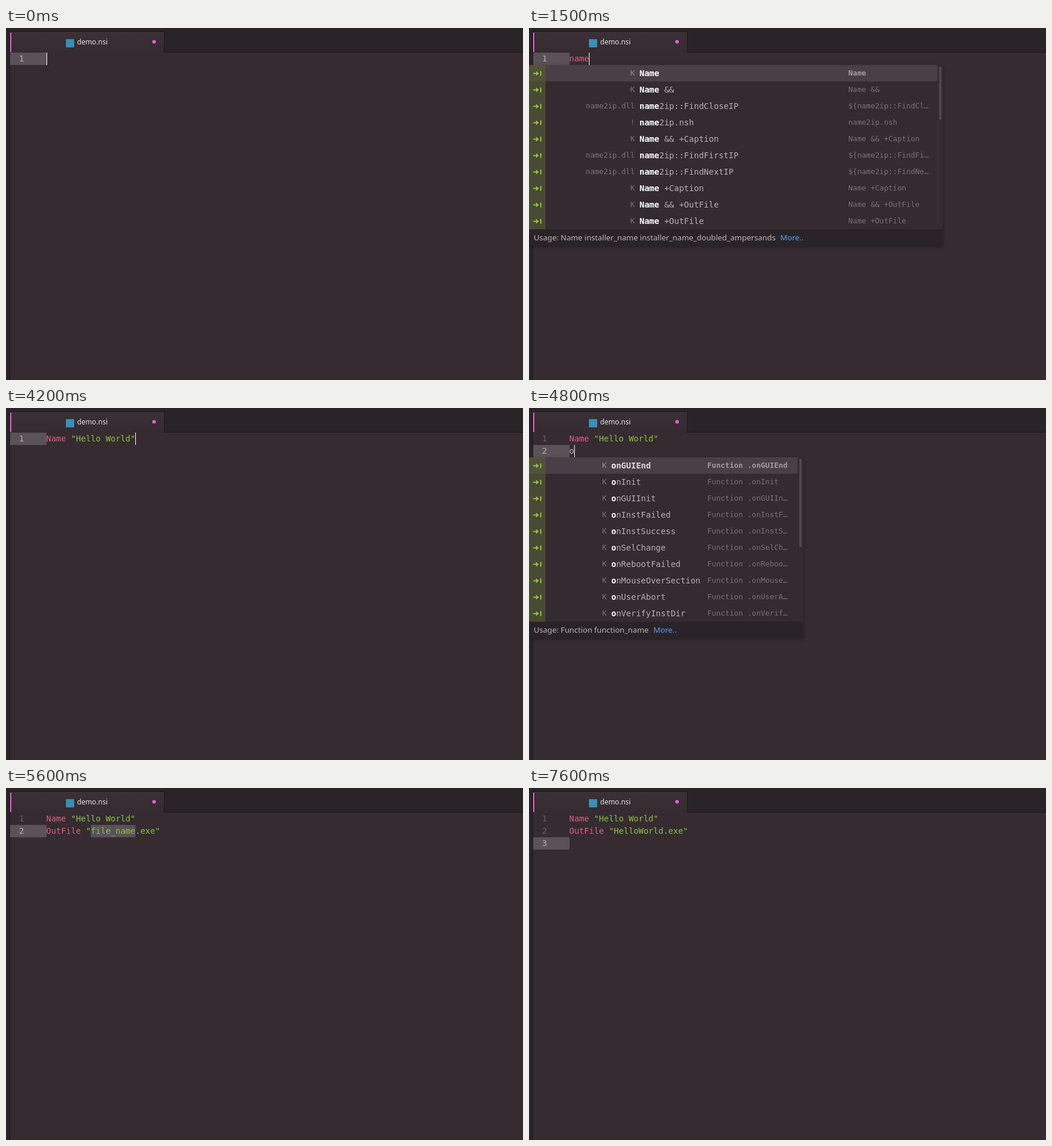
An HTML page with a canvas for the animation above (8 s loop, 880 px wide and 600 px high).

```html
<!DOCTYPE html>
<html lang="en">
<head>
<meta charset="utf-8">
<title>Editor autocomplete</title>
<style>
  html, body { margin: 0; width: 100%; height: 100%; overflow: hidden; background: #352b31; }
  canvas { display: block; }
</style>
</head>
<body>
<canvas id="stage" width="880" height="600"></canvas>
<script>
const ctx = document.getElementById('stage').getContext('2d');
const LOOP = 8000, LINE = 21, ROW = 28, TEXT_X = 68.5, CHAR = 8.43;
const MONO = '"DejaVu Sans Mono", monospace', SANS = '"Noto Sans", sans-serif';
const CODE = '14px ' + MONO, LABEL = '12.6px ' + MONO;
const DARK = '#2a2429', EDGE = '#1c181b', GREEN = '#8bc53f';

// Completion entries: [left label, word, right label]
const dll = name => ['name2ip.dll', 'name2ip::' + name, '${name2ip::' + name + '}'];
const keyword = word => ['K', word, word];
const callback = word => ['K', word, 'Function .' + word];
const header = ['!', 'name2ip.nsh', 'name2ip.nsh'];
const [close, first, next] = ['FindCloseIP', 'FindFirstIP', 'FindNextIP'].map(dll);
const [name, amp, ampCaption, caption, ampOut, out] = ['Name', 'Name &&', 'Name && +Caption',
  'Name +Caption', 'Name && +OutFile', 'Name +OutFile'].map(keyword);

const wideMenu = {
  left: 0, right: 800, wordX: 203, labelX: 624, chars: 20, usage: '${name2ip::FindCloseIP}',
  items: [close, header, first, next, name, amp, ampCaption, caption, ampOut, out]
};
const nameMenu = {
  left: 0, right: 705, wordX: 188, labelX: 544, chars: 18,
  usage: 'Name installer_name installer_name_doubled_ampersands',
  items: [name, amp, close, header, ampCaption, first, next, caption, ampOut, out]
};
const callbackMenu = {
  left: 0, right: 467, wordX: 140, labelX: 304, chars: 18, usage: 'Function function_name',
  items: ['onGUIEnd', 'onInit', 'onGUIInit', 'onInstFailed', 'onInstSuccess', 'onSelChange',
    'onRebootFailed', 'onMouseOverSection', 'onUserAbort', 'onVerifyInstDir'].map(callback)
};
const outMenu = {
  left: 14, right: 395, wordX: 68, labelX: 232, chars: 18, usage: 'OutFile [path\\]install.exe',
  items: [keyword('OutFile'), keyword('OutFile +Name'),
    ...['onUserAbort', 'onGUIInit', 'onMouseOverSection'].map(callback)]
};

// Timeline of editor states; the cursor column belongs to the last line.
const steps = [];
const add = (time, lines, cursor, extra) => steps.push({ time, lines, cursor, ...extra });
const suggest = (time, before, query, menu, thumb) =>
  add(time, [...before, query], query.length, { menu, thumb });
function type(text, times, before, prefix, suffix) {
  times.forEach((time, i) => {
    const typed = prefix + text.slice(0, i + 1);
    add(time, [...before, typed + suffix], typed.length);
  });
}

const line1 = 'Name "Hello World"', line2 = 'OutFile "HelloWorld.exe"';
add(0, [''], 0);
suggest(1000, [], 'n', wideMenu, 9);
suggest(1100, [], 'na', wideMenu, 40);
suggest(1300, [], 'nam', wideMenu, 88);
suggest(1500, [], 'name', nameMenu, 90);
add(2000, ['Name "name"'], null, { selection: [6, 10] });
type('Hello World', [2500, 2700, 2800, 3000, 3100, 3200, 3400, 3500, 3700, 3800, 4000],
  [], 'Name "', '"');
add(4200, [line1], line1.length);
add(4300, [line1, ''], null);
suggest(4800, [line1], 'o', callbackMenu, 150);
suggest(5000, [line1], 'ou', outMenu, 0);
suggest(5100, [line1], 'out', outMenu, 0);
add(5600, [line1, 'OutFile "file_name.exe"'], null, { selection: [9, 18] });
type('HelloWorld', [6100, 6200, 6300, 6500, 6600, 6800, 6900, 7100, 7200, 7300],
  [line1], 'OutFile "', '.exe"');
add(7500, [line1, line2], line2.length);
add(7600, [line1, line2, ''], null);

function rect(x, y, w, h, color) {
  ctx.fillStyle = color;
  ctx.fillRect(x, y, w, h);
}

function text(str, x, y, color, font = CODE, align = 'left') {
  ctx.font = font;
  ctx.textAlign = align;
  ctx.fillStyle = color;
  ctx.fillText(str, x, y);
}

function drawFrame() {
  rect(0, 0, 880, 600, '#352b31');
  rect(0, 0, 880, 41, DARK);
  rect(0, 41, 880, 1, EDGE);
  rect(0, 41, 6, 559, DARK);
  rect(6, 41, 1, 559, EDGE);

  const shade = ctx.createLinearGradient(0, 7, 0, 41);
  shade.addColorStop(0, '#3a3036');
  shade.addColorStop(1, '#352b31');
  rect(6, 6, 264, 36, EDGE);
  rect(7, 7, 262, 35, shade);
  rect(7, 7, 262, 1, '#443a40');
  rect(7, 8, 2, 33, '#f55fde');
  rect(102, 19, 14, 14, '#3a8fb7');
  text('demo.nsi', 121, 28, '#e6e0e4', '500 12px ' + SANS);
  ctx.fillStyle = '#f55fde';
  ctx.beginPath();
  ctx.arc(252, 23.5, 3, 0, 7);
  ctx.fill();
}

function drawCode({ lines, cursor, selection }) {
  lines.forEach((line, i) => {
    const y = 42 + i * LINE, base = y + 15, active = i === lines.length - 1;
    if (active) {
      rect(7, y, 62, LINE, '#5b5258');
      if (selection) {
        const [from, to] = selection;
        rect(TEXT_X + from * CHAR, y, (to - from) * CHAR, LINE, '#5b5258');
      }
    }
    text(i + 1, 30.8, base, active ? '#b8afb5' : '#6a6066', CODE, 'right');
    const [, word, rest] = line.match(/^(\w*)(.*)$/);
    text(word, TEXT_X, base, /^(name|outfile)$/i.test(word) ? '#e0607e' : '#bdb5ba');
    text(rest, TEXT_X + word.length * CHAR, base, GREEN);
    if (active && cursor !== null) {
      rect(Math.floor(TEXT_X + cursor * CHAR + 0.5), y, 1, LINE, '#ffffff');
    }
  });
}

function drawArrow(x, y) {
  rect(x, y - 1, 6, 2, GREEN);
  ctx.beginPath();
  ctx.moveTo(x + 5, y - 4);
  ctx.lineTo(x + 10, y);
  ctx.lineTo(x + 5, y + 4);
  ctx.fill();
  rect(x + 12, y - 4, 2, 8, GREEN);
}

// Letters that match the typed query stand out.
function drawWord(word, query, x, y, selected) {
  let matched = 0;
  [...word].forEach((letter, i) => {
    const hit = matched < query.length && letter.toLowerCase() === query[matched];
    if (hit) matched++;
    const color = hit ? '#ffffff' : selected ? '#ddd6da' : '#b8afb4';
    text(letter, x + i * CHAR, y, color, (hit || selected ? 'bold ' : '') + CODE);
  });
}

function drawMenu({ lines, menu, thumb }) {
  const { left, right, wordX, labelX, chars, items, usage } = menu;
  const query = lines[lines.length - 1], top = 42 + lines.length * LINE;
  const height = items.length * ROW, bottom = top + height;
  ctx.save();
  ctx.shadowColor = 'rgba(0,0,0,.3)';
  ctx.shadowBlur = 6;
  ctx.shadowOffsetY = 2;
  rect(left, top, right - left, height + ROW, DARK);
  ctx.restore();
  rect(left, top, right - left, height, '#342b30');
  rect(left, top, right - (thumb ? 10 : 3) - left, ROW, '#4a3f46');
  rect(left, top, 28, height, '#494a33');
  rect(left, top, 28, ROW, '#52523b');

  items.forEach(([kind, word, label], i) => {
    const y = top + i * ROW, selected = i === 0;
    const shown = label.length > chars ? label.slice(0, chars - 1) + '…' : label;
    drawArrow(left + 7, y + 14.5);
    text(kind, wordX - 8, y + 18, selected ? '#978d93' : '#7d7379', LABEL, 'right');
    drawWord(word, query, wordX, y + 19, selected);
    text(shown, labelX - 0.5, y + 18, selected ? '#a49aa0' : '#7a7076',
      (selected ? 'bold ' : '') + LABEL);
  });
  if (thumb) rect(right - 7, top + 3, 4, thumb, '#50464c');

  const help = 'Usage: ' + usage, font = '13.2px ' + SANS;
  text(help, left + 8, bottom + 19, '#bdb4b9', font);
  text('More..', left + 16 + ctx.measureText(help).width, bottom + 19, '#5c9ff2', font);
}

function draw(now) {
  const time = now % LOOP;
  const state = steps.findLast(step => step.time <= time) || steps[0];
  drawFrame();
  drawCode(state);
  if (state.menu) drawMenu(state);
  requestAnimationFrame(draw);
}
draw(0);
</script>
</body>
</html>
```
